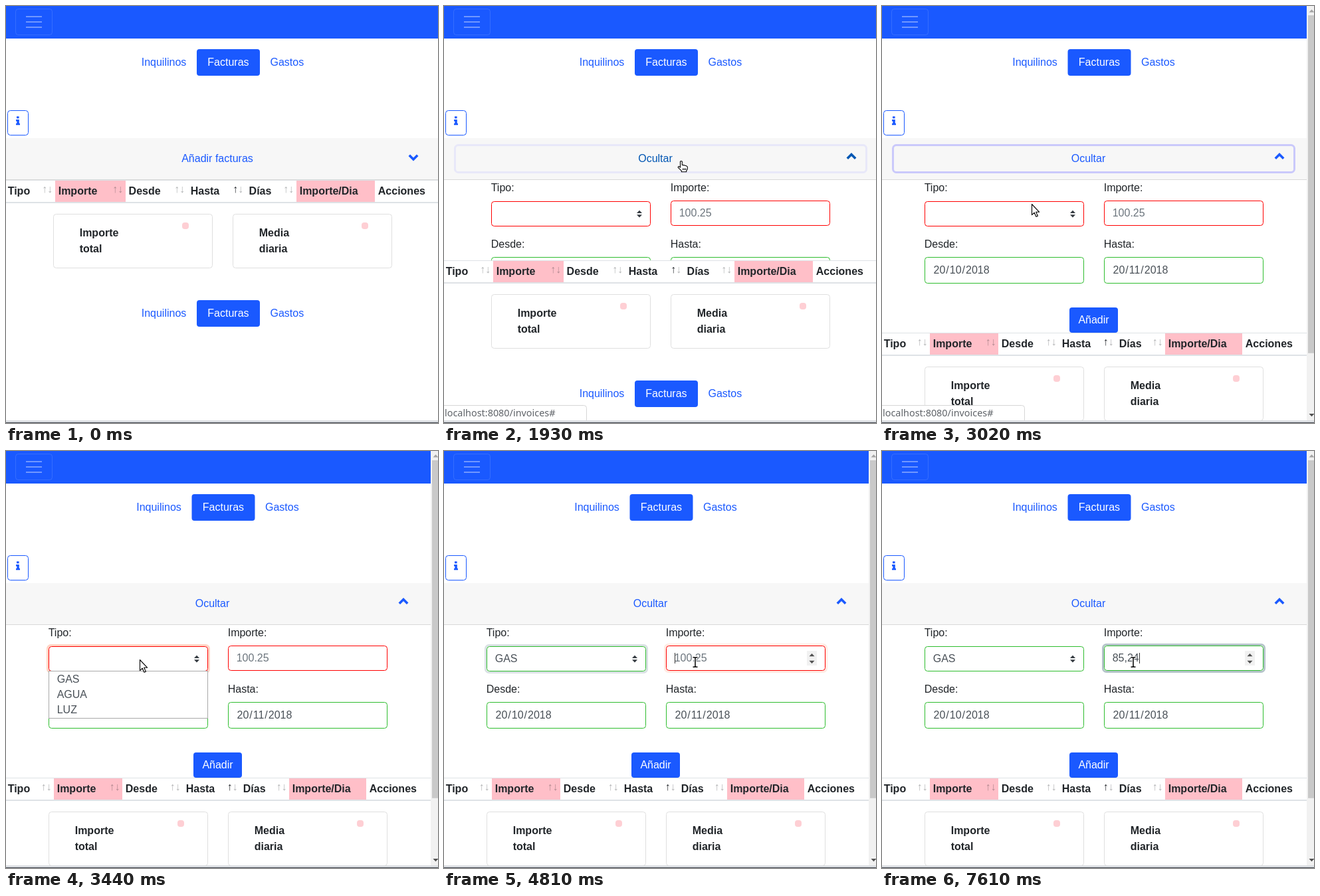
Animation, 650 px wide and 628 px high, one loop 8 s. Source, as an HTML page:

```html
<!DOCTYPE html>
<html lang="es">
<head>
<meta charset="utf-8">
<title>Facturas</title>
<style>
html, body { margin: 0; width: 100%; height: 100%; overflow: hidden; background: #fff; }
svg { display: block; width: 650px; height: 628px; }
text { font: 16px "Liberation Sans", Arial, sans-serif; fill: #212529; white-space: pre; }
.b { font-weight: 700; }
.link { fill: #1a59ff; }
.on { fill: #fff; }
.val { fill: #495057; }
.box { fill: #fff; stroke: #dfdfdf; }
.ok { fill: #fff; stroke: #2ebd2e; }
.line { fill: #dee2e6; }
.pink { fill: #ffbfc8; }
.dot { fill: #fecfd4; }
.dim { opacity: .35; }
#url { font: 14.4px "Noto Sans", "Open Sans", sans-serif; fill: #5f6368; }
</style>
</head>
<body>
<svg viewBox="0 0 650 628" xmlns="http://www.w3.org/2000/svg">
  <defs>
    <clipPath id="fold"><rect id="foldBox" y="262" width="650" height="0"/></clipPath>
    <g id="nav">
      <rect x="287" width="95" height="40" rx="4" fill="#1a59ff"/>
      <text class="link" x="203.7" y="25">Inquilinos</text>
      <text class="on" x="303.3" y="25">Facturas</text>
      <text class="link" x="397.5" y="25">Gastos</text>
    </g>
  </defs>
  <rect width="650" height="628" fill="#fff"/>
  <rect width="650" height="49" fill="#1a59ff"/>
  <rect x="14.5" y="4.5" width="55" height="39" rx="4" fill="none" stroke="#fff" stroke-opacity=".12"/>
  <path d="M30 16h24M30 24h24M30 32h24" stroke="#fff" stroke-opacity=".5" stroke-width="1.7"/>
  <use id="navTop" href="#nav"/>

  <rect x="2.5" y="157.5" width="31" height="37" rx="4" fill="#fff" stroke="#1a59ff"/>
  <path d="M16 166.3h3.6v3H16zM15 171h4.8v5.8H21v2.4h-6v-2.4h1.3v-3.4H15z" fill="#1a59ff"/>

  <rect y="199" width="650" height="62" fill="#f7f7f7"/>
  <rect y="261" width="650" height="1" fill="#d8d8d8"/>
  <rect id="btnRing" x="16.5" y="209.5" height="41" rx="5" fill="none" stroke="#cac9fb" stroke-width="3"/>
  <text id="toggle" y="235"></text>
  <path id="chevron" fill="none" stroke-width="3.6"/>

  <g clip-path="url(#fold)"><g id="form">
    <text x="63.7" y="279">Tipo:</text>
    <text x="333.7" y="279">Importe:</text>
    <text x="63.7" y="364">Desde:</text>
    <text x="333.7" y="364">Hasta:</text>
    <rect id="selRing" x="62.5" y="292.5" width="243" height="41" rx="5" fill="none" stroke-width="3"/>
    <rect id="sel" x="64.5" y="294.5" width="239" height="37" rx="4" fill="#fff"/>
    <text id="selText" class="val" x="76.7" y="318">GAS</text>
    <path d="M283 312l4-4.2 4 4.2zM283 314.2l4 4.2 4-4.2z" fill="#343a40"/>
    <rect id="ampRing" x="332.5" y="291.5" width="243" height="41" rx="5" fill="none" stroke-width="3"/>
    <rect id="amp" x="334.5" y="293.5" width="239" height="37" rx="4" fill="#fff"/>
    <text id="ampText" x="346.7" y="317"></text>
    <rect id="caret" y="304" width="1" height="16" fill="#333"/>
    <g id="spin">
      <rect x="546" y="301" width="15" height="22" fill="#f1f1f1"/>
      <path d="M549.5 309.2l4-4.2 4 4.2zM549.5 315.8l4 4.2 4-4.2z" fill="#505050"/>
    </g>
    <g id="dates"></g>
    <rect x="282" y="454" width="73" height="38" rx="4" fill="#1a59ff"/>
    <text class="on" x="295.4" y="478">Añadir</text>
  </g></g>

  <g id="lower">
    <rect class="line" y="262" width="650" height="1"/>
    <g id="table"></g>
    <rect class="line" y="295" width="650" height="2"/>
    <g id="cards"></g>
    <use id="navLow" href="#nav"/>
  </g>

  <g id="popup">
    <rect x="64.5" y="331.5" width="239" height="71" fill="#fff" stroke="#a9a9a9"/>
    <rect id="pick" x="65" y="332" width="238" height="23" fill="#c8c8c8"/>
    <text class="val" x="76.7" y="349">GAS</text>
    <text class="val" x="76.7" y="372">AGUA</text>
    <text class="val" x="76.7" y="395">LUZ</text>
  </g>

  <g id="scroll">
    <rect x="639" width="11" height="624" fill="#f1f1f1"/>
    <path d="M642.5 9.5l4-4.2 4 4.2z" fill="#a3a3a3"/>
    <path d="M642.5 614l4 4.2 4-4.2z" fill="#505050"/>
    <rect id="thumb" x="641" y="14" width="9" fill="#c9c9c9"/>
  </g>
  <g id="status">
    <path d="M-1 601.5H210.5q4 0 4 4V625H-1z" fill="#fff" stroke="#d6d6d6"/>
    <text id="url" x="1" y="618">localhost:8080/invoices#</text>
  </g>
  <rect y="624" width="650" height="3" fill="#dcdfe3"/>
  <rect y="627" width="650" height="1" fill="#41454d"/>

  <g id="cursor" stroke-linejoin="round">
    <path id="arrow" d="M.5.5V16.6l3.7-3.4 2.7 6.1 2.5-1.1-2.7-5.9h5z" fill="#fff" stroke="#000" stroke-width="1.1"/>
    <path id="hand" transform="translate(-7 -1)" d="M4.5 2.2q1.4-1.5 2.8 0V7.4l2.2.2 2.2.6 2 .6 1.6 1.4v3.2l-1.6 2.8v1.5H6.3v-1.6L1.3 11.4q-.4-1.8 1.3-1.8l1.9 1.5zM8.6 12.4v2.6M10.6 12.4v2.6M12.6 12.4v2.6" fill="#fff" stroke="#000" stroke-width="1.1"/>
    <g id="beam" fill="none">
      <path d="M-3.5-7.3h2.5l1 1 1-1h2.5M0-6.5v13M-3.5 7.3h2.5l1-1 1 1h2.5" stroke="#fff" stroke-width="3.4"/>
      <path d="M-3.5-7.3h2.5l1 1 1-1h2.5M0-6.5v13M-3.5 7.3h2.5l1-1 1 1h2.5" stroke="#000" stroke-width="1.5"/>
    </g>
  </g>
</svg>
<script>
const LOOP = 8000;
const el = {};
document.querySelectorAll('[id]').forEach(e => el[e.id] = e);

const BLUE = '#1a59ff', HOVER = '#0056b3';
const RED = [255, 0, 0], GREEN = [46, 189, 46];
const RING_BAD = [255, 213, 197], RING_OK = [180, 196, 201];

// label, text x wide/narrow, sort arrows x wide/narrow
const COLS = [
  ['Tipo', 2.7, 2.7, 54, 52.5], ['Importe', 78.7, 76.7, 160, 155.5],
  ['Desde', 184.6, 179.8, 253, 246.5], ['Hasta', 277.7, 270.7, 341, 332.5],
  ['Días', 365.6, 356.8, 417, 406.5], ['Importe/Dia', 441.7, 430.7], ['Acciones', 559.8, 546.8]
];
const BANDS = [[[74, 106], [72, 103]], [[437, 118], [426, 116]]];
// start, end, steps, x, y reached
const MOVES = [
  [1190, 1450, 6, 358, 233], [2780, 3020, 6, 225, 298], [3090, 3230, 4, 205, 312],
  [3430, 3570, 4, 190, 321], [3610, 3730, 4, 168, 347], [4030, 4470, 10, 378, 318]
];
// time, height of the unfolded form
const FOLD = [[1880, 51], [1930, 121], [1990, 179], [2040, 207], [2100, 224], [2150, 230]];
const TYPED = [[0, '100.25'], [5520, '8'], [5720, '85'], [6830, '85,'], [7350, '85,2'], [7610, '85,24']];
const CARET = [[4760, 5340], [5520, 6260], [6830, LOOP]];

const set = (e, o) => { for (const k in o) e.setAttribute(k, o[k]); };
const show = (e, on) => e.style.display = on ? '' : 'none';
const shift = (e, x, y = 0) => e.setAttribute('transform', `translate(${x} ${y})`);
const mix = (a, b, p) => `rgb(${a.map((v, i) => Math.round(v + (b[i] - v) * p))})`;
const latest = (rows, t, first) => rows.reduce((v, r) => t >= r[0] ? r[1] : v, first);

// share done of a move whose first step shows at a and last at b
function steps(t, a, b, n) {
  if (t < a) return 0;
  return Math.min(1, (Math.floor((t - a) / (b - a) * (n - 1) + 1e-6) + 1) / n);
}

el.table.innerHTML = BANDS.map(() => '<rect class="pink" y="263" height="32"/>').join('') +
  COLS.map(([name, , , arrows]) => `<text class="b" y="284">${name}</text>` + (arrows === undefined ? '' :
    `<g class="sort"><text class="b${name === 'Hasta' ? '' : ' dim'}" y="281">↑</text>` +
    '<text class="b dim" x="8" y="281">↓</text></g>')).join('');
el.cards.innerHTML = [['Importe', 'total', 0], ['Media', 'diaria', 270]].map(([a, b, x]) =>
  `<g transform="translate(${x})"><rect class="box" x="71.5" y="313.5" width="239" height="81" rx="4"/>
  <text class="b" x="110.7" y="347">${a}</text><text class="b" x="110.7" y="371">${b}</text>
  <rect class="dot" x="265" y="326" width="10" height="10" rx="4"/></g>`).join('');
el.dates.innerHTML = [['10', 64.5], ['11', 334.5]].map(([m, x]) =>
  `<rect class="ok" x="${x}" y="378.5" width="239" height="39" rx="4"/>` +
  `<text class="val" x="${x + 13}" y="403">` +
  ['20', '/', m, '/', '2018'].map((s, i) => `<tspan dx="${i ? 1 : 0}">${s}</tspan>`).join('') + '</text>').join('');

const labels = el.table.querySelectorAll(':scope > text');
const sorts = el.table.querySelectorAll('.sort');
const bands = el.table.querySelectorAll('.pink');

function layout(narrow) {
  const n = narrow ? 1 : 0;
  shift(el.navTop, -7.5 * n, 65);
  shift(el.navLow, -7.5 * n, 443);
  shift(el.form, 7 - 7 * n);
  shift(el.cards, -7 * n);
  set(el.btnRing, { width: 619 - 15 * n });
  COLS.forEach((c, i) => {
    set(labels[i], { x: c[1 + n] });
    if (sorts[i]) shift(sorts[i], c[3 + n]);
  });
  BANDS.forEach((b, i) => set(bands[i], { x: b[n][0], width: b[n][1] }));
}

function cursor(t) {
  let x = 368, y = 153;
  for (const [a, b, n, tx, ty] of MOVES) {
    const p = steps(t, a, b, n);
    x += (tx - x) * p;
    y += (ty - y) * p;
  }
  const inButton = y >= 208 && y <= 251;
  const inAmount = t > 4000 && x >= 334 && y >= 293 && y <= 331;
  show(el.cursor, t >= 920);
  shift(el.cursor, Math.round(x), Math.round(y));
  show(el.hand, inButton);
  show(el.beam, inAmount);
  show(el.arrow, !inButton && !inAmount);
  return { inButton, inAmount };
}

function draw(t) {
  const open = t >= 1880, off = latest(FOLD, t, 0), narrow = off > 123;
  const { inButton, inAmount } = cursor(t);
  layout(narrow);

  const ink = inButton ? HOVER : BLUE;
  el.toggle.textContent = open ? 'Ocultar' : 'Añadir facturas';
  set(el.toggle, { x: open ? (narrow ? 284.7 : 292.2) : 264.2 });
  el.toggle.style.fill = ink;
  set(el.chevron, {
    stroke: ink,
    d: open ? 'M591.8 229.7l6.2-6.2 6.2 6.2' : 'M606.8 224.8l6.2 6.2 6.2-6.2',
    transform: `translate(${open && !narrow ? 15 : 0})`
  });
  set(el.btnRing, { opacity: steps(t, 1880, 1990, 3) - steps(t, 3330, 3430, 3) });

  set(el.foldBox, { height: off });
  shift(el.lower, 0, off);
  show(el.scroll, narrow);
  set(el.thumb, { height: 596 * 624 / (501 + off) });
  show(el.status, t >= 1600 && t < 3140);

  const selOk = t < 3980 ? 0 : Math.min(1, steps(t, 3980, 4080, 3) + .07);
  set(el.sel, { stroke: mix(RED, GREEN, selOk) });
  set(el.selRing, {
    stroke: mix(RING_BAD, RING_OK, selOk),
    opacity: steps(t, 3330, 3430, 3) - steps(t, 4760, 4910, 4)
  });
  show(el.selText, t >= 3980);
  show(el.popup, t >= 3380 && t < 3980);
  show(el.pick, t >= 3690);

  const ampOk = steps(t, 5520, 5670, 4);
  set(el.amp, { stroke: mix(RED, GREEN, ampOk) });
  set(el.ampRing, { stroke: mix(RING_BAD, RING_OK, ampOk), opacity: steps(t, 4760, 4910, 4) });
  const typed = latest(TYPED, t, '');
  el.ampText.textContent = typed;
  el.ampText.style.fill = t < 5520 ? '#6c757d' : '#495057';
  const width = t < 5520 ? 0 : [...typed].reduce((w, c) => w + (c === ',' ? 4.45 : 8.9), 0);
  set(el.caret, { x: Math.round(347 + width) });
  show(el.caret, CARET.some(([a, b]) => t >= a && t < b));
  show(el.spin, inAmount);
}

const start = performance.now();
function frame() {
  draw((performance.now() - start) % LOOP);
  requestAnimationFrame(frame);
}
draw(0);
requestAnimationFrame(frame);
</script>
</body>
</html>
```
